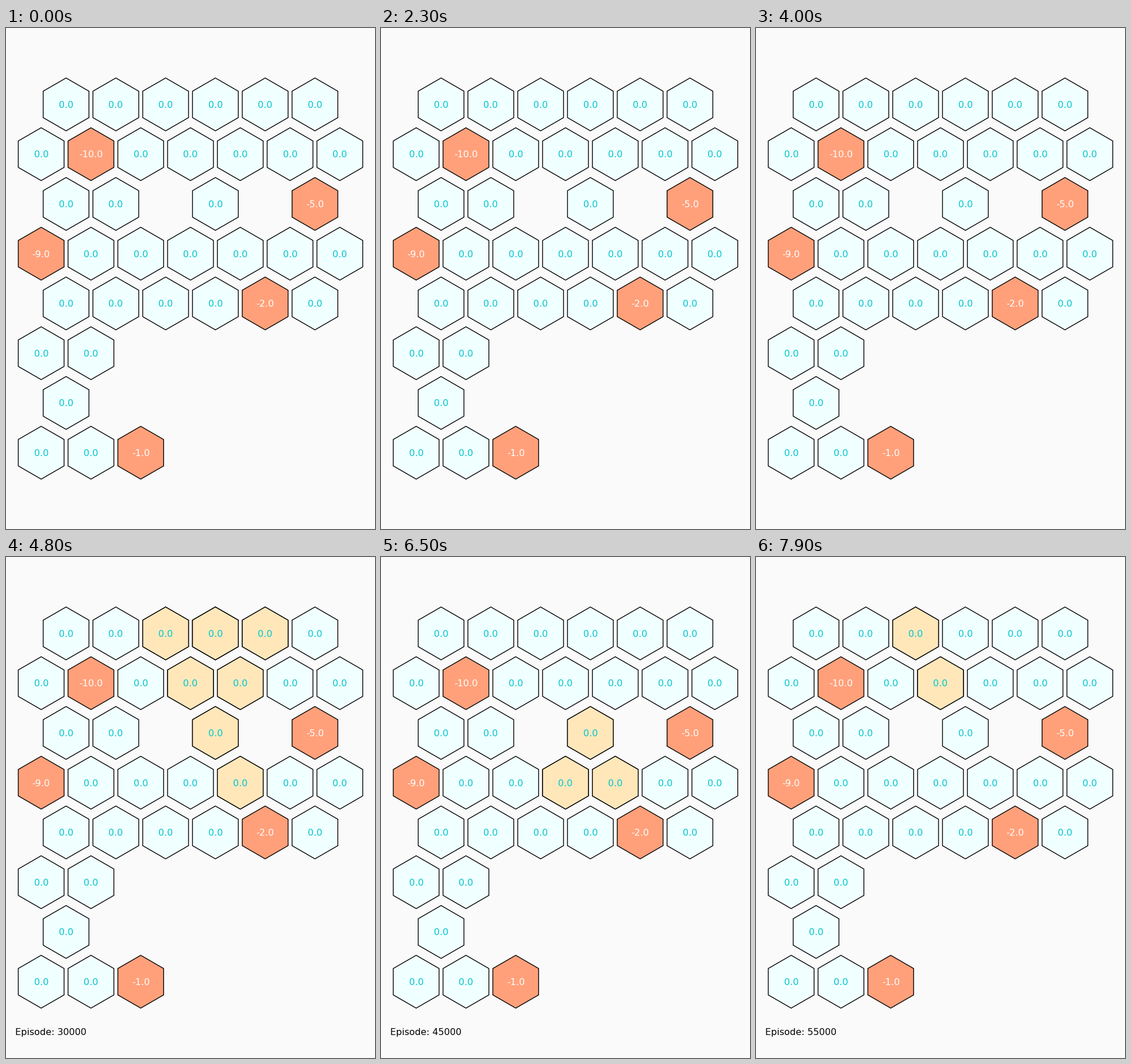
Write a matplotlib script that moves like this. It is 642 px wide and 872 px high and loops after 8 s.

```python
import math

import matplotlib.pyplot as plt
from matplotlib.animation import FuncAnimation
from matplotlib.patches import RegularPolygon

W, H, DPI = 642, 872, 100
STEP_MS = 100
RADIUS = 46
PITCH = 50 * math.sqrt(3)
X0, Y0 = 61.2, 133
FONT = 16 * 72 / DPI

BACK, PLAIN, PENALTY, VISITED = "#fafafa", "#f0ffff", "#ffa07a", "#ffe7ba"
VALUE_INK = "#00c5cd"

# Columns present in each row; even rows are shifted right by half a cell.
ROWS = ["012345", "0123456", "0135", "0123456", "012345", "01", "0", "012"]
REWARDS = {(1, 1): -10, (2, 5): -5, (3, 0): -9, (4, 4): -2, (7, 2): -1}

# One walk per episode, each step as row and column; a repeat is a bump.
WALKS = [
    "43 34 33 23 13 02 12 01",
    "23 13 02 03 14 15 04 05 05 16 16 05 16",
    "50 60 71",
    "32 21 31",
    "13 02 03 14 04 15 05 16",
    "34 23 13 02 03 03 14 04 15 05 16",
    "36 45",
    "34 33 32 41 31 40",
    "23 33 34",
    "23 33 42 41 51 50 60 60 60 71",
    "13 02",
]
EPISODE_STEP = 5000


def center(row, col):
    shift = 0.5 if row % 2 == 0 else 0
    return X0 + PITCH * (col + shift), Y0 + PITCH * row


def add_hex(row, col, color, z):
    patch = RegularPolygon(center(row, col), 6, radius=RADIUS, facecolor=color,
                           edgecolor="black", linewidth=1, zorder=z)
    return ax.add_patch(patch)


def build_timeline():
    """Each entry holds the episode label and the cells walked so far."""
    timeline = []
    for i, walk in enumerate(WALKS, 1):
        cells = [(int(step[0]), int(step[1])) for step in walk.split()]
        timeline.append(("", []))
        for n in range(1, len(cells) + 1):
            timeline.append((f"Episode: {i * EPISODE_STEP}", cells[:n]))
    return timeline


plt.rcParams["font.family"] = "DejaVu Sans"
fig = plt.figure(figsize=(W / DPI, H / DPI), dpi=DPI, facecolor=BACK)
ax = fig.add_axes([0, 0, 1, 1])
ax.set_xlim(0, W)
ax.set_ylim(H, 0)
ax.axis("off")

for row, cols in enumerate(ROWS):
    for col in map(int, cols):
        reward = REWARDS.get((row, col), 0)
        add_hex(row, col, PENALTY if reward else PLAIN, 1)
        x, y = center(row, col)
        ax.text(x, y + 5.8, f"{reward:.1f}", ha="center", va="baseline",
                fontsize=FONT, color="white" if reward else VALUE_INK, zorder=3)

label = ax.text(16, 832, "", va="baseline", fontsize=FONT, color="black")
timeline = build_timeline()
trail = []


def draw(frame):
    while trail:
        trail.pop().remove()
    text, cells = timeline[frame]
    label.set_text(text)
    trail.extend(add_hex(row, col, VISITED, 2) for row, col in cells)
    return [label, *trail]


anim = FuncAnimation(fig, draw, frames=len(timeline), init_func=lambda: draw(0),
                     interval=STEP_MS, repeat=True, repeat_delay=0, blit=False)
plt.show()
```
